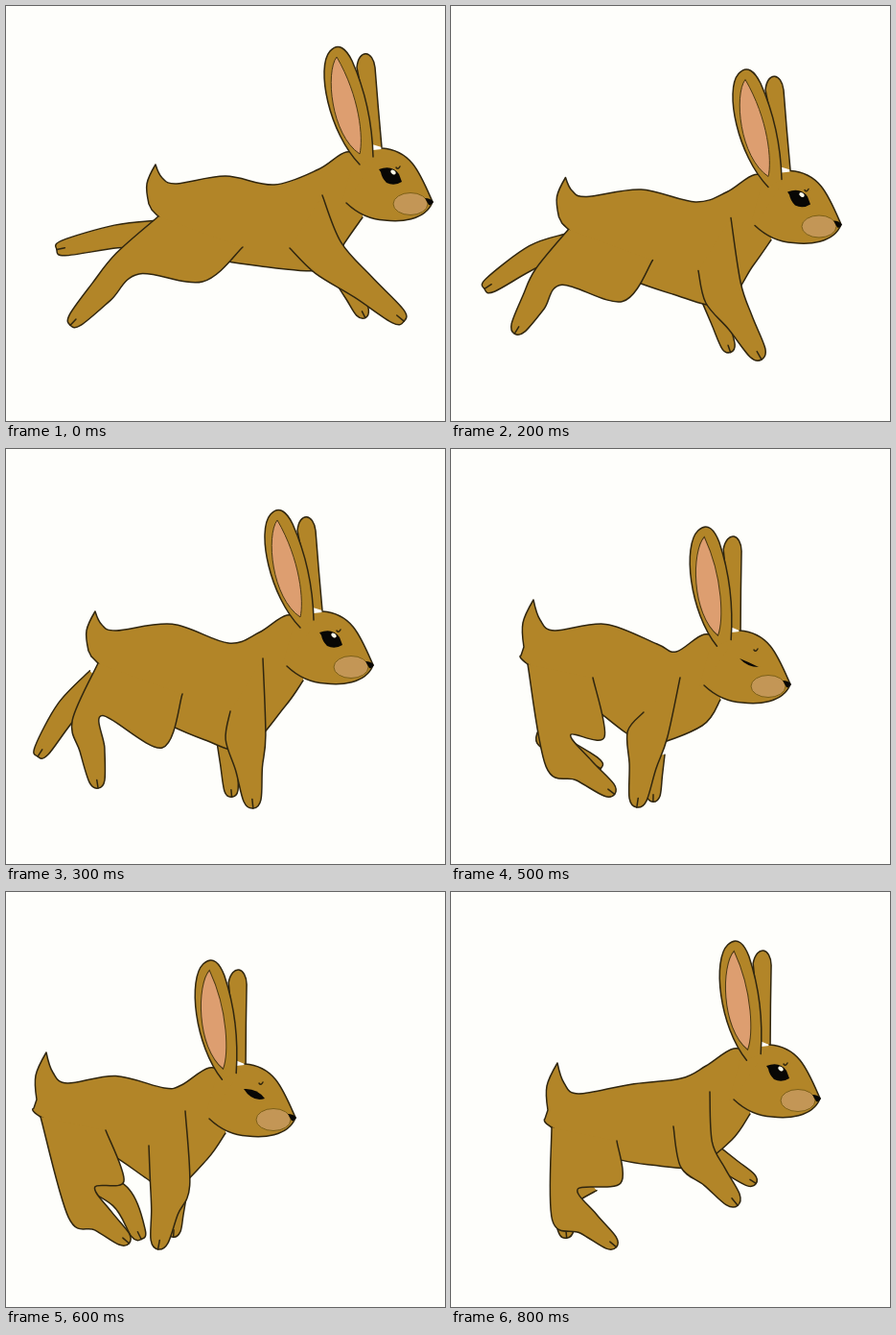
An HTML page for the animation above (0.9 s loop, 458x432 px).

```html
<!DOCTYPE html>
<html lang="en">
<head>
<meta charset="utf-8">
<title>Running rabbit</title>
<style>
  html, body { margin: 0; width: 100%; height: 100%; overflow: hidden; background: #fefefb; }
  svg { display: block; width: 100%; height: 100%; }
  .fur { fill: #b28528; stroke: #30260f; stroke-width: 1.5; stroke-linejoin: round; stroke-linecap: round; }
  .line { fill: none; }
  .flat { stroke: none; }
</style>
</head>
<body>
<svg id="stage" viewBox="0 0 458 432"></svg>
<script>
const STEP = 100;
// Pose for each step; halves blend two neighbours.
const SEQUENCE = [0, 1, 1.5, 2, 2.5, 3, 4, 4.5, 5];

// Joints of each key pose. "up" raises the tail and tips the ears forward.
const JOINTS = ['nose', 'dip', 'rump', 'thigh', 'hock', 'toe', 'elbow', 'paw', 'farHock', 'farToe', 'farElbow', 'farPaw'];
const POSES = [
  [0, '445,204 280,186 178,185 205,287 127,268 72,327 336,262 409,323 115,240 60,252 355,285 372,319'],
  [0, '431,230 278,206 168,208 195,304 119,284 45,324 318,297 383,356 110,249 45,267 312,305 344,353'],
  [0, '383,225 232,202 115,189 163,311 85,280 95,346 250,300 257,366 64,272 37,314 230,298 235,356'],
  [1, '354,245 215,203 108,189 160,300 112,314 165,355 205,297 195,365 100,300 150,329 212,318 211,361'],
  [1, '302,235 165,204 64,199 123,301 79,323 123,361 171,302 160,364 120,318 138,355 177,318 175,353'],
  [1, '385,215 240,194 133,210 177,303 119,325 167,365 256,273 294,320 117,322 120,353 275,275 313,300']
].map(([up, text]) => ({ up, points: parse(text) }));

const TAIL_LOW = parse('-15,-6 -22,-20 -31,0 -29,21 -26,27 -19,34');
const TAIL_HIGH = parse('-15,-11 -22,-32 -33,-8 -32,17 -35,26 -28,35');
const BODY_CORNERS = [7, 9, 10];

function parse(text) { return text.split(' ').map(p => p.split(',').map(Number)); }
const lerp = (a, b, k) => a + (b - a) * k;
const mix = (a, b, k = 0.5) => [lerp(a[0], b[0], k), lerp(a[1], b[1], k)];
const shift = (p, x, y) => [p[0] + x, p[1] + y];

// Smooth curve through points, with sharp turns at the given indices.
function spline(pts, corners = []) {
  const last = pts.length - 1;
  const tangent = i => {
    if (corners.includes(i)) return [0, 0];
    const a = pts[Math.max(0, i - 1)], b = pts[Math.min(last, i + 1)];
    return [(b[0] - a[0]) / 6, (b[1] - a[1]) / 6];
  };
  let d = 'M' + pts[0];
  for (let i = 0; i < last; i++) {
    const p = pts[i], q = pts[i + 1], s = tangent(i), t = tangent(i + 1);
    d += `C${shift(p, ...s)} ${shift(q, -t[0], -t[1])} ${q}`;
  }
  return d;
}

const stage = document.getElementById('stage');
function add(tag, attrs = {}, parent = stage) {
  const el = document.createElementNS('http://www.w3.org/2000/svg', tag);
  for (const key in attrs) el.setAttribute(key, attrs[key]);
  return parent.appendChild(el);
}
const fur = (d, parent, extra = '') => add('path', { class: 'fur ' + extra, d }, parent);
const ink = (d, parent) => add('path', { d, fill: '#080705' }, parent);

// Outline of a leg: down one side of its joints, round the foot, up the other.
function makeLimb() {
  const skin = fur(''), crease = fur('', stage, 'line');
  return (joints, widths, side, start = [], end = []) => {
    const near = [], far = [];
    let tip;
    joints.forEach((p, i) => {
      const a = joints[i - 1] || p, b = joints[i + 1] || p;
      const angle = Math.atan2(b[1] - a[1], b[0] - a[0]);
      const x = Math.cos(angle) * widths[i], y = Math.sin(angle) * widths[i];
      near.push(shift(p, -y * side, x * side));
      far.unshift(shift(p, y * side, -x * side));
      tip = shift(p, x * 0.9, y * 0.9);
    });
    skin.setAttribute('d', spline([...start, ...near, tip, ...far, ...end]));
    crease.setAttribute('d', `M${tip}L${mix(tip, joints[joints.length - 1], 1.2)}`);
  };
}

// Head pieces are drawn around the tip of the nose.
const farEar = fur('M-63,-60L-79,-140C-77,-160 -62,-158 -60,-140Q-57,-100 -53,-57');
const farHind = makeLimb(), farFore = makeLimb();
const body = fur('');
const hind = makeLimb(), fore = makeLimb();

const head = add('g');
fur('M-95,2L-80,-52L-53,-55L-40,0Z', head, 'flat');
fur('M-53,-56C-22,-54 -13,-30 0,0C-8,20 -35,21 -50,19Q-72,18 -90,1', head);
add('ellipse', { cx: -23, cy: 2, rx: 18, ry: 11.5, fill: '#c39656', stroke: '#7d6017' }, head);
ink('M-8,-4Q-2,-4 1,0Q-1,4 -4,3Z', head);
fur('M-38,-36Q-36,-33 -34,-37', head, 'line');

const eyes = { open: add('g', {}, head), half: add('g', {}, head), shut: add('g', {}, head) };
ink('M-56,-34Q-42,-39 -35,-29L-32,-21Q-40,-16 -48,-20Q-53,-25 -54,-31Z', eyes.open);
add('ellipse', { cx: -41, cy: -31, rx: 3, ry: 2, fill: '#fffbe8', transform: 'rotate(35 -41 -31)' }, eyes.open);
ink('M-54,-30Q-40,-31 -32,-20Q-45,-16 -54,-30Z', eyes.half);
ink('M-53,-27Q-45,-18 -33,-18Q-43,-23 -53,-27Z', eyes.shut);

const nearEar = add('g');
fur('M-76,-39C-108,-72 -122,-140 -107,-157C-98,-167 -90,-159 -84,-147C-72,-120 -63,-85 -62,-47', nearEar);
add('path', { fill: '#dd9e70', stroke: '#4a3812', d: 'M-100,-151C-112,-135 -106,-70 -76,-50C-72,-66 -76,-110 -100,-151Z' }, nearEar);

function drawHead(nose, up, pose) {
  const place = `translate(${nose})`;
  const lean = `${place} rotate(${5.5 * up} -68 -45)`;
  head.setAttribute('transform', place);
  farEar.setAttribute('transform', lean);
  nearEar.setAttribute('transform', lean);
  // One blink, closed at pose 3.
  const lid = pose === 3 ? 'shut' : pose > 2 && pose <= 4 ? 'half' : 'open';
  for (const key in eyes) eyes[key].setAttribute('display', key === lid ? 'inline' : 'none');
}

function draw(pose) {
  const i = Math.floor(pose), k = pose - i;
  const a = POSES[i], b = POSES[Math.ceil(pose)];
  const up = lerp(a.up, b.up, k);
  const j = {};
  JOINTS.forEach((name, n) => j[name] = mix(a.points[n], b.points[n], k));

  const tail = TAIL_LOW.map((p, n) => shift(j.rump, ...mix(p, TAIL_HIGH[n], up)));
  const seat = tail[tail.length - 1];
  const arch = 8 + (j.dip[1] - j.rump[1]) * 0.4;
  body.setAttribute('d', spline([
    shift(j.nose, -66, -45), shift(j.nose, -90, -52), shift(j.nose, -119, -34),
    j.dip, shift(mix(j.rump, j.dip), 0, -arch), j.rump, ...tail,
    mix(j.rump, j.thigh, 0.7), shift(mix(j.thigh, j.elbow), 0, -3),
    shift(j.elbow, 0, 12), shift(j.nose, -92, 43), shift(j.nose, -73, 16)
  ], BODY_CORNERS));

  const hip = shift(j.rump, ...mix([69, 66], [40, 49], up));
  hind([j.hock, mix(j.hock, j.toe), j.toe], [16 + 5 * up, 13, 8], 1, [seat], [j.thigh, hip]);

  const shoulder = shift(j.nose, -115, -7);
  const armpit = shift(shoulder, ...mix([-34, 55], [-38, 36], up));
  fore([j.elbow, mix(j.elbow, j.paw), j.paw], [21, 14, 9], -1, [shoulder], [armpit]);

  const farHip = shift(j.rump, ...mix([-18, 52], [10, 90], up));
  farHind([farHip, j.farHock, j.farToe], [14, 12, 8], 1);
  farFore([j.farElbow, mix(j.farElbow, j.farPaw), j.farPaw], [11, 9, 7], -1);

  drawHead(j.nose, up, pose);
}

const start = performance.now();
let shown = -1;
function tick() {
  const step = Math.floor((performance.now() - start) / STEP) % SEQUENCE.length;
  if (step !== shown) draw(SEQUENCE[shown = step]);
  requestAnimationFrame(tick);
}
tick();
</script>
</body>
</html>
```
